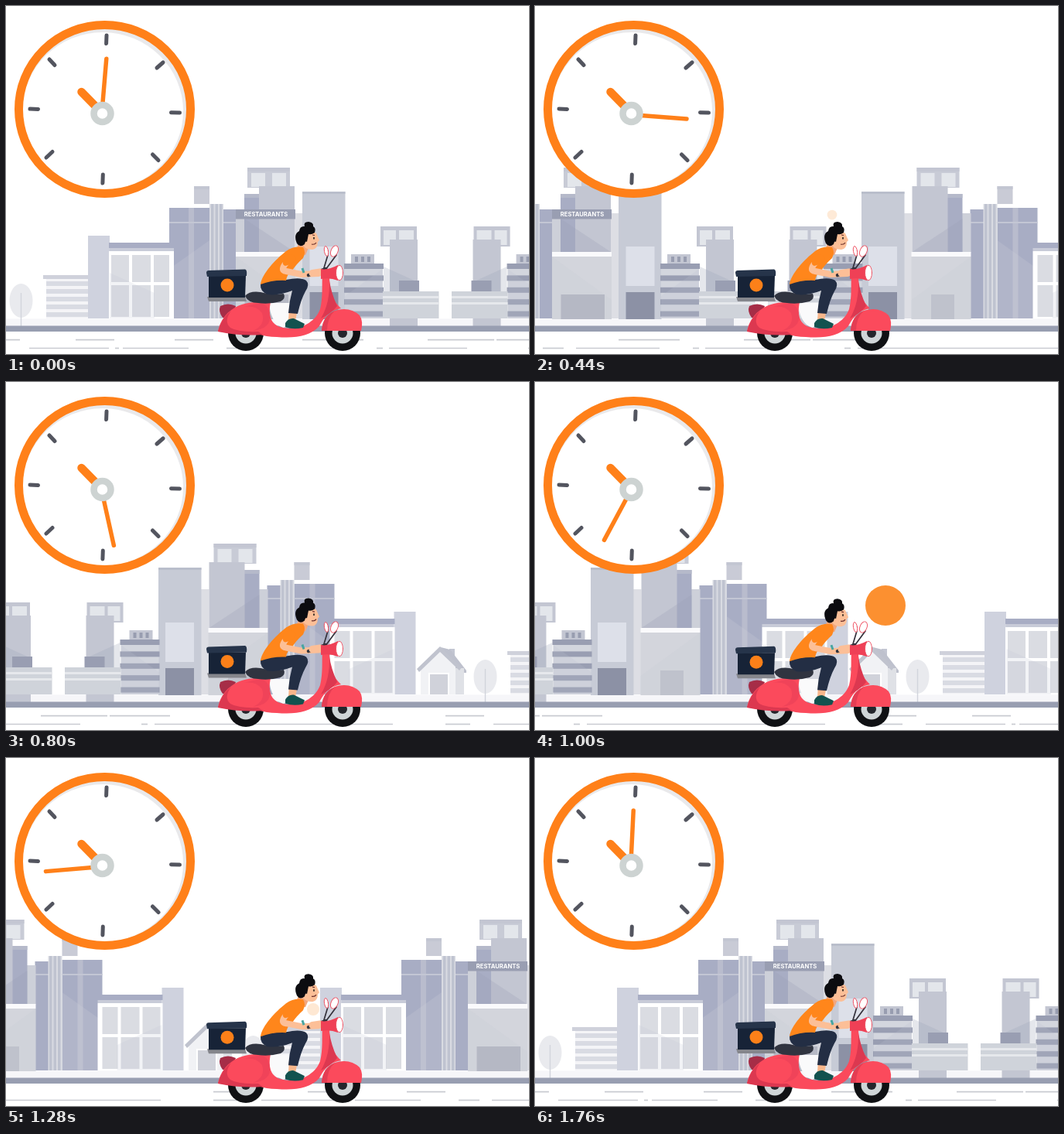
An HTML page that plays this animation: 676 by 450 pixels, repeating every 1800 ms.

```html
<!DOCTYPE html>
<html lang="en">
<head>
<meta charset="utf-8">
<title>Delivery ride</title>
<style>
html, body { margin: 0; width: 100%; height: 100%; overflow: hidden; background: #fff; }
svg { display: block; width: 676px; height: 450px; }
</style>
</head>
<body>
<svg viewBox="0 0 676 450" xmlns="http://www.w3.org/2000/svg">
  <defs>
    <g id="block"></g>
    <g id="city"></g>
    <g id="lines" stroke="#c9cbd1" stroke-width="1.7"></g>
  </defs>

  <rect y="404.500" width="676" height="9" fill="#f6f6f9"/>
  <g id="cityTrack"><use href="#city"/><use href="#city" x="1100"/></g>
  <rect y="413.500" width="676" height="7.500" fill="#989eb1"/>
  <g id="lineTrack"><use href="#lines"/><use href="#lines" x="1100"/></g>

  <g id="clock" stroke-linecap="round">
    <ellipse cx="127.500" cy="133.500" rx="111" ry="109" fill="#e9e9eb"/>
    <ellipse cx="125" cy="136" rx="104" ry="102" fill="#fff"/>
    <ellipse cx="127.500" cy="133.500" rx="111" ry="109" fill="none" stroke="#ff8019" stroke-width="11"/>
    <path d="M130 38l-.4 10.500M203 73l-8 7M213.500 137.700l11 .4M189.500 192l7.500 7.500M125.300 218l-.4 11M60 188.500l-8 7.500M31 133l10.500 .4M56 69l7 7.500" stroke="#53555f" stroke-width="5"/>
    <path d="M97.500 111L121 135" stroke="#ff8019" stroke-width="10.500"/>
    <path id="minute" d="M123.700 140.500V68" stroke="#ff8019" stroke-width="5.500"/>
    <circle cx="124.500" cy="139" r="11" fill="#fff" stroke="#cdd3d2" stroke-width="8.500"/>
  </g>

  <circle id="pin" fill="#fc8a24"/>

  <g id="wheels">
    <g id="wheel"><circle cx="310" cy="423" r="23" fill="#101114"/><circle cx="310" cy="423" r="13.500" fill="#cfd5d7"/><circle cx="310" cy="423" r="6" fill="#24262c"/></g>
    <use href="#wheel" x="125"/>
  </g>

  <g id="scooter">
    <path d="M277 388q10-5 20 0l-6 15h-11q-6-8-3-15z" fill="#a62d47"/>
    <path d="M340 384H367V414L358 416Q342 410 340 384z" fill="#fafafb"/>
    <path d="M274 421C278 400 295 383 325 383H342C339 398 341 410 354 415C378 422 400 409 406 392C410 376 408 360 409 349L418 351C418 370 423 382 433 391C416 394 410 405 405 414C393 427 374 430 350 428Q336 428 326 424Z" fill="#fb4a5c"/>
    <path d="M274 421Q278 404 291 394Q281 408 290 416Q300 422 326 421L332 425Q302 427 274 421Z" fill="#dc3850"/>
    <path d="M302 390Q322 385 331 397Q336 413 319 420Q344 417 341 398Q339 386 329 384Z" fill="#f04359"/>
    <path d="M418 355Q419 384 407 404Q420 398 428 388Q420 370 418 355Z" fill="#dc3850"/>
    <path d="M408 420Q409 401 425 394Q444 388 457 400Q462 407 459 420Z" fill="#fb4a5c"/>
    <path d="M408 420Q409 401 425 394Q415 403 415 420Z" fill="#e43d53"/>
    <path d="M309 375Q315 368 329 370Q342 374 359 372Q362 378 355 382Q340 386 326 384Q313 384 309 375Z" fill="#303440"/>
  </g>

  <g id="rider">
    <path d="M260 376H309L311 382H262Z" fill="#85868c"/>
    <path d="M262 349H310L309 377H262Z" fill="#172337"/>
    <path d="M259 345Q259 342 262 342L309 340.500Q312 341 311 349L260 350Z" fill="#26344a"/>
    <circle cx="286" cy="361" r="8.500" fill="#fc8019"/>
    <path d="M366 391L377 392 374 407H365Z" fill="#f8b68b"/>
    <path d="M361 410Q365 403 372 404Q382 409 386 411L384 416Q371 419 361 415Z" fill="#12524f"/>
    <path d="M329 359Q340 354 362 354Q381 350 388 355Q393 360 387 369Q381 380 377 398L365 397Q366 382 370 368Q352 375 338 373Q328 369 329 359Z" fill="#232e44"/>
    <path d="M378 307L393 308 387 322 374 318Z" fill="#f2a67c"/>
    <path d="M329 360C331 346 348 328 362 317Q372 310 384 312Q388 318 384 326Q375 334 370 342Q363 347 362 355Q345 354 329 360Z" fill="#ff861b"/>
    <path d="M364 330Q353 342 362 343L382 347 404 346" fill="none" stroke="#fcbf97" stroke-width="8" stroke-linejoin="round" stroke-linecap="round"/>
    <path d="M360 322Q374 319 375 327Q369 335 361 336Q355 335 360 322Z" fill="#ff861b"/>
    <path d="M383 339l2 6" stroke="#47a5a0" stroke-width="3"/>
    <path d="M382 291Q393 288 401 294L405 303 403 305Q403 314 396 315Q385 315 381 305Z" fill="#fcbf97"/>
    <path d="M376 307Q371 295 379 291Q380 284 386 285Q384 279 391 279Q398 280 397 285Q401 287 399 293Q395 296 391 295L389 305Q387 303 386 308Q380 313 376 307Z" fill="#0c0c10"/>
    <path d="M396 296l3 .500M395 308q4 1 6-2" stroke="#6c302c" stroke-width="1.200" fill="none"/>
    <path d="M398 299v2.500" stroke="#111" stroke-width="1.500"/>
  </g>

  <g id="handlebar" stroke-linecap="round">
    <path d="M391 348L413 340" stroke="#30343f" stroke-width="4.500"/>
    <path d="M396 345.500L406 344" stroke="#fcbf97" stroke-width="9"/>
    <path d="M410 342L416 322M413 341L427 322" stroke="#34313b" stroke-width="1.700"/>
    <path d="M407 340Q416 342 429 335V355Q419 351 407 353Z" fill="#ef4056"/>
    <g fill="#fff" stroke="#ee4a5c" stroke-width=".9">
      <ellipse cx="431" cy="345" rx="4.500" ry="9.800"/>
      <ellipse cx="414" cy="317" rx="2.500" ry="6.500" transform="rotate(-10 414 317)"/>
      <ellipse cx="424.500" cy="317" rx="4.500" ry="7.500" transform="rotate(22 424.500 317)"/>
    </g>
  </g>
</svg>

<script>
const LOOP = 1800, STEP = 40, SPEED = 0.625, CITY = 1100;
const el = id => document.getElementById(id);
const rect = (x, y, x2, y2, fill) =>
  `<rect x="${x}" y="${y}" width="${x2 - x}" height="${y2 - y}" fill="${fill}"/>`;
const path = (d, fill, opacity = 1) => `<path d="${d}" fill="${fill}" opacity="${opacity}"/>`;
const repeat = (n, make) => Array.from({ length: n }, (_, i) => make(i)).join('');

const pale = '#dadce2', grey = '#c3c6d2', lilac = '#a8adc4', slate = '#999eb2', glass = '#e3e6eb';

function purpleBuilding() {
  return rect(243, 233, 263, 256, '#c9cbd6') + rect(243, 233, 263, 237, grey) +
    rect(211, 261, 263, 404, lilac) + rect(236, 261, 243, 404, '#b9bccd') +
    rect(280, 263, 298, 404, lilac) + rect(211, 279, 298, 281, '#c3c6d4') +
    path('M263 303L211 340V404H263Z', '#d0d2dc', .2) +
    rect(263, 256, 281, 404, '#d9dbe2') +
    repeat(3, i => rect(265 + i * 5.5, 256, 268.5 + i * 5.5, 404, '#bfc3d0'));
}

function glassBuilding() {
  return rect(106, 297, 134, 404, '#cfd2de') + rect(133, 306, 217, 313, lilac) +
    rect(134, 313, 217, 317, '#c8cbd8') + rect(133, 317, 217, 404, '#fff') +
    [[136, 159], [163, 187], [191, 211]].map(([a, b]) =>
      rect(a, 322, b, 357, pale) + rect(a, 361, b, 402, pale)).join('') +
    path('M134 345L192 371V404H134Z', '#bfc3cf', .2);
}

function tallBuilding() {
  return rect(373, 268, 384, 404, '#dddee4') +
    rect(312, 209, 367, 235, '#c8cbd6') + rect(312, 209, 367, 214, grey) +
    rect(317, 216, 335, 234, glass) + rect(344, 216, 362, 234, glass) +
    rect(297, 268, 309, 319, '#cdd0d9') + rect(308, 243, 328, 319, lilac) +
    rect(308, 243, 328, 248, '#b5b9ca') + rect(327, 233, 373, 319, grey) +
    path('M308 275L373 318H308Z', slate, .28) +
    rect(297, 318, 374, 324, '#fafafc') + rect(297, 324, 374, 405, '#d3d5dc') +
    path('M297 324L374 380V405H297Z', grey, .2);
}

function plainTower() {
  return rect(383, 240, 438.5, 405, '#c7cbd6') + rect(383, 240, 438.5, 243, '#b9becb') +
    rect(392.5, 311, 429.5, 362, '#dde0e9') + rect(392.5, 370, 429.5, 405, '#8c91a5');
}

function stripedOffice() {
  return rect(446, 321, 476, 333, grey) +
    repeat(3, i => rect(451 + i * 8, 324, 455 + i * 8, 331, '#989db0')) +
    rect(438, 333, 487, 404, '#d3d6de') +
    repeat(5, i => rect(437, 333 + i * 15.4, 488, 340 + i * 15.4, slate)) +
    path('M487 340L438 375V404H487Z', '#b9bdca', .2);
}

function wingBuilding() {
  return rect(484, 285, 531, 311, grey) + rect(488, 290, 504, 309, glass) +
    rect(508, 290, 527, 309, glass) + rect(496, 302, 532, 414, grey) +
    path('M488 337L532 357V370H488Z', slate, .25) + rect(508, 355, 534, 369, slate) +
    rect(487, 369, 559.5, 404, '#cfd3da') + rect(487, 375, 559.5, 378, '#e6e8ec') +
    rect(487, 383, 559.5, 386, '#e6e8ec');
}

function house() {
  return rect(1073, 345, 1080, 366, grey) +
    path('M1062 343L1074 346 1095 373V376H1080Z', '#bec1cd') +
    rect(1038, 370, 1092, 404, '#dfe1e6') +
    path('M1036 404V370L1062 346 1081 365V404Z', '#f1f2f5') +
    path('M1031 371L1061 342 1089 369 1086 373 1061 349 1034 375Z', '#c0c3ce') +
    rect(1046, 376, 1073, 404, '#fff') + rect(1048, 378, 1071, 404, '#d0d2da');
}

function stripedHouse() {
  return rect(48, 348, 107, 353, '#cfd1db') + rect(52, 353, 107, 404, '#f4f4f7') +
    repeat(5, i => rect(52, 356 + i * 10, 107, 362 + i * 10, '#d9dbe3'));
}

el('block').innerHTML = purpleBuilding() + glassBuilding() + tallBuilding() +
  plainTower() + stripedOffice() + wingBuilding();

el('city').innerHTML =
  '<ellipse cx="19.5" cy="381" rx="15" ry="22" fill="#e9eaee"/>' +
  rect(18.8, 371, 20.2, 414, '#d2d4dc') + stripedHouse() + house() +
  '<use href="#block"/><use href="#block" transform="translate(1135.5) scale(-1 1)"/>' +
  rect(308.5, 373, 365, 405, '#b5b8c4') + rect(787, 373, 817, 405, '#bfc2cc') +
  rect(297, 263, 374, 275.5, slate) +
  '<text x="336" y="272" text-anchor="middle" fill="#fff" font-family="Inter, Arial, sans-serif" font-weight="700" font-size="7.6">RESTAURANTS</text>';

const upper = [[-32, 18], [90, 140], [218, 268], [383, 462], [545, 631], [634, 712]];
const lower = [[30, 133], [141, 146], [151, 236], [285, 312], [328, 436], [479, 487],
  [495, 596], [675, 683], [692, 1000], [1068, 1100]];
const dash = y => ([a, b]) => `<path d="M${a} ${y}H${b}"/>`;
el('lines').innerHTML = upper.map(dash(431.7)).join('') + lower.map(dash(442.5)).join('');

const clamp = v => Math.max(0, Math.min(1, v));
const mix = (a, b, k) => a + (b - a) * k;

function pinAt(t) {
  if (t >= 400 && t <= 520) {
    const k = 1 - Math.abs(t - 460) / 80;
    return { x: 384, y: 270, r: 8.5 * k, o: .24 * k };
  }
  if (t < 840 || t > 1300) return { x: 0, y: 0, r: 0, o: 0 };
  if (t <= 1000) {
    const k = clamp((t - 820) / 140);
    return { x: 453 + SPEED * (1000 - t), y: 289, r: 26 * k, o: .94 * k };
  }
  const k = (t - 1000) / 280;
  return { x: mix(453, 397, k), y: mix(289, 325, k * k), r: mix(26, 8, k), o: clamp(mix(.94, .2, k)) };
}

function draw(t) {
  const shift = (t * SPEED) % CITY;
  for (const id of ['cityTrack', 'lineTrack']) el(id).setAttribute('transform', `translate(${-shift})`);
  el('minute').setAttribute('transform', `rotate(${4.8 + t * 0.2034} 123.7 140.5)`);
  const bob = 1 - Math.cos(t / 440 * 2 * Math.PI);
  el('rider').setAttribute('transform', `translate(0 ${bob})`);
  const { x, y, r, o } = pinAt(t);
  const pin = el('pin');
  pin.setAttribute('cx', x);
  pin.setAttribute('cy', y);
  pin.setAttribute('r', r);
  pin.setAttribute('opacity', o);
}

const start = performance.now();
function tick() {
  const t = (performance.now() - start) % LOOP;
  draw(Math.floor(t / STEP) * STEP);
  requestAnimationFrame(tick);
}
draw(0);
requestAnimationFrame(tick);
</script>
</body>
</html>
```
